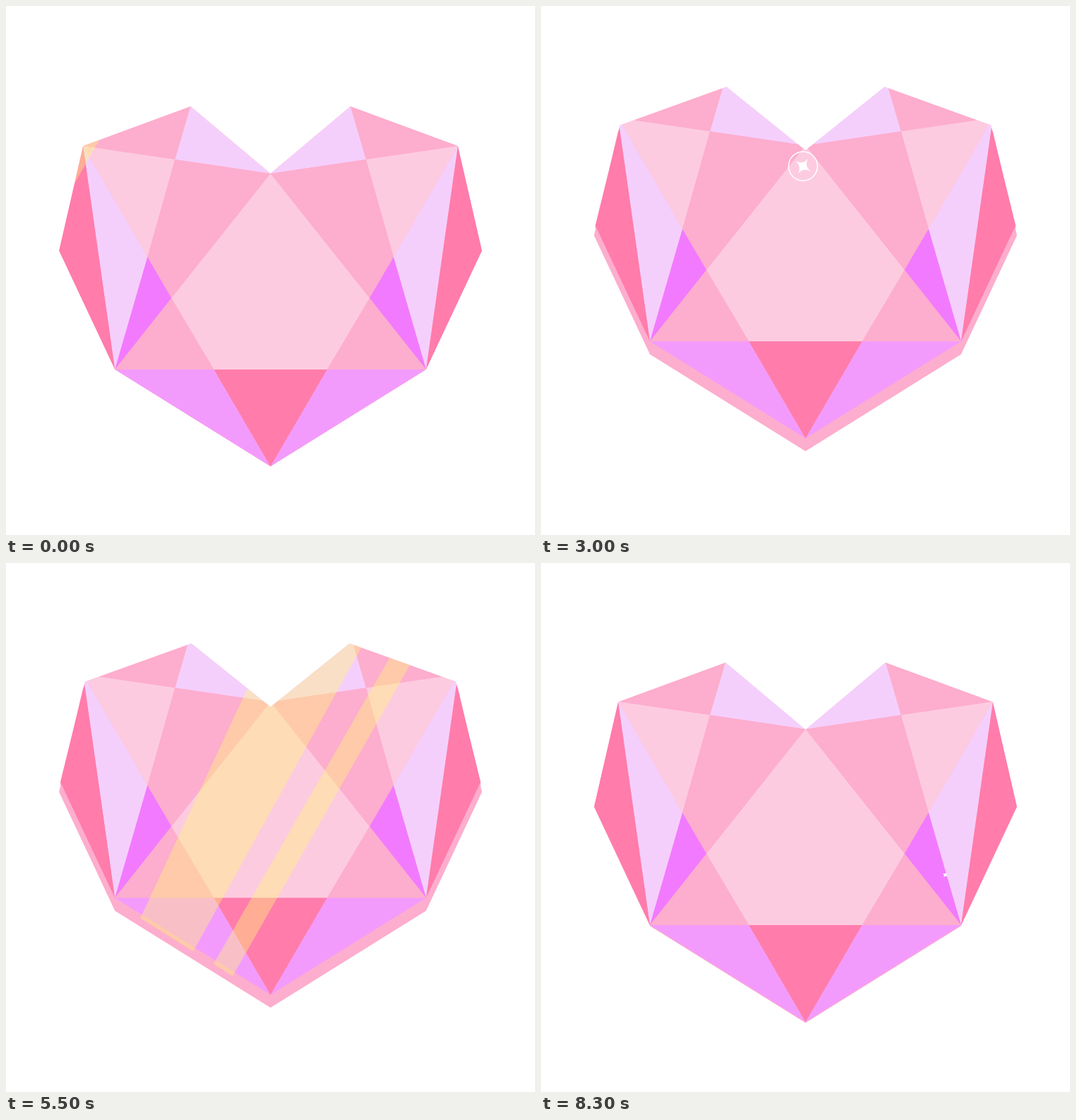
An HTML page with a canvas for the animation above (8.4 s loop, 748 by 748 pixels).

```html
<!DOCTYPE html>
<html lang="en">
<head>
<meta charset="utf-8">
<title>Heart gem</title>
<style>
html, body { margin: 0; width: 100%; height: 100%; overflow: hidden; background: #fff; }
canvas { display: block; width: 100vmin; height: 100vmin; }
</style>
</head>
<body>
<canvas id="stage" width="748" height="748"></canvas>
<script>
const ctx = document.getElementById('stage').getContext('2d');
const SIZE = 748, LOOP = 4200, STEP = 100;
const RED = '#ff7cab', PINK = '#fdadcd', PALE = '#fdcbe0',
      LILAC = '#f5cffc', VIOLET = '#f27aff', ORCHID = '#f39bfc';

// Left half of the gem; the right half is its mirror image.
const corner = [109, 198], peak = [261, 142], notch = [374, 237],
      crown = [239, 217], waist = [200, 355], girdle = [234, 413],
      side = [75, 346], base = [154, 514], keel = [294, 514], tip = [374, 651];

const mirror = ([x, y]) => [SIZE - x, y];
const closeShape = half => [...half, ...half.slice(1, -1).reverse().map(mirror)];
const outline = closeShape([notch, peak, corner, side, base, tip]);

const sideFacets = [
  [PINK, corner, peak, crown],
  [LILAC, peak, notch, crown],
  [PALE, corner, crown, waist],
  [PINK, crown, notch, girdle, waist],
  [LILAC, corner, waist, base],
  [VIOLET, waist, girdle, base],
  [PINK, base, girdle, keel],
  [RED, corner, side, base],
  [ORCHID, base, keel, tip]
];
const facets = [
  ...sideFacets,
  ...sideFacets.map(([color, ...points]) => [color, ...points.map(mirror)]),
  [PALE, notch, girdle, keel, mirror(keel), mirror(girdle)],
  [RED, keel, mirror(keel), tip]
];

const sparkles = [
  { x: 566, y: 193, start: 100 },
  { x: 370.5, y: 226.5, start: 2840 },
  { x: 571.5, y: 441, start: 3400 }
];

function trace(points) {
  ctx.beginPath();
  points.forEach(([x, y]) => ctx.lineTo(x, y));
  ctx.closePath();
}

function fill(points, color) {
  trace(points);
  ctx.fillStyle = color;
  ctx.fill();
}

// Window through which the facets are seen, for a given facet lift.
function facetWindow(lift) {
  const shift = ([x, y], inset, rise) => [x + inset * lift, y - rise * lift];
  return closeShape([
    shift(notch, 0, .83), shift(peak, .03, .7), shift(corner, .07, .745),
    shift(side, .03, .83), shift(base, .03, .83), shift(tip, 0, .83)
  ]);
}

// Slanted band; each edge is [x at y = 300, slant].
function band(left, right) {
  const at = ([x, slant], y) => [x - slant * (y - 300), y];
  fill([at(left, 0), at(right, 0), at(right, SIZE), at(left, SIZE)],
       'rgba(255, 246, 116, .4)');
}

function drawSheen(t) {
  const s = t - 500;
  band([21 + .329 * s, .466], [152 + .297 * s + .065 * Math.max(0, t - 1100), .553]);
  band([171 + .345 * s, .575], [228 + .318 * s, .57]);
}

function drawSparkle({ x, y, start }, t) {
  const u = (t - start) / 800;
  if (u <= 0 || u >= 1) return;
  const r = 51 * Math.sin(Math.PI * u) ** 2.6;
  const polar = (radius, a) => [x + radius * Math.cos(a), y + radius * Math.sin(a)];
  ctx.fillStyle = ctx.strokeStyle = '#fff';
  ctx.beginPath();
  ctx.moveTo(...polar(r, .59));
  for (let i = 0; i < 4; i++) {
    const a = .59 + i * Math.PI / 2;
    ctx.quadraticCurveTo(...polar(r * .12, a + Math.PI / 4), ...polar(r, a + Math.PI / 2));
  }
  ctx.fill();
  if (u < .4) {
    ctx.lineWidth = 3 * (1 - u / .4);
    ctx.beginPath();
    ctx.arc(x, y, 102 * u, 0, 2 * Math.PI);
    ctx.stroke();
  }
}

function draw(t) {
  const phase = 2 * Math.PI * t / LOOP;
  const linear = 1 - Math.abs(1 - 2 * t / LOOP);
  const smooth = (1 - Math.cos(phase)) / 2;
  const lift = 64.5 * ((linear + smooth) / 2 - .025 * Math.sin(phase));
  const backLift = 45 * Math.max(0, linear ** 1.4 - .02 * Math.sin(phase));

  ctx.clearRect(0, 0, SIZE, SIZE);
  fill(outline.map(([x, y]) => [x, y - backLift]), PINK);

  ctx.save();
  trace(facetWindow(lift));
  ctx.clip();
  ctx.fillStyle = PINK;
  ctx.fill();
  ctx.save();
  ctx.translate(0, -lift);
  facets.forEach(([color, ...points]) => fill(points, color));
  ctx.restore();
  drawSheen(t);
  ctx.restore();

  sparkles.forEach(sparkle => drawSparkle(sparkle, t));
}

function frame() {
  draw(Math.floor(performance.now() / STEP) * STEP % LOOP);
  requestAnimationFrame(frame);
}
frame();
</script>
</body>
</html>
```
